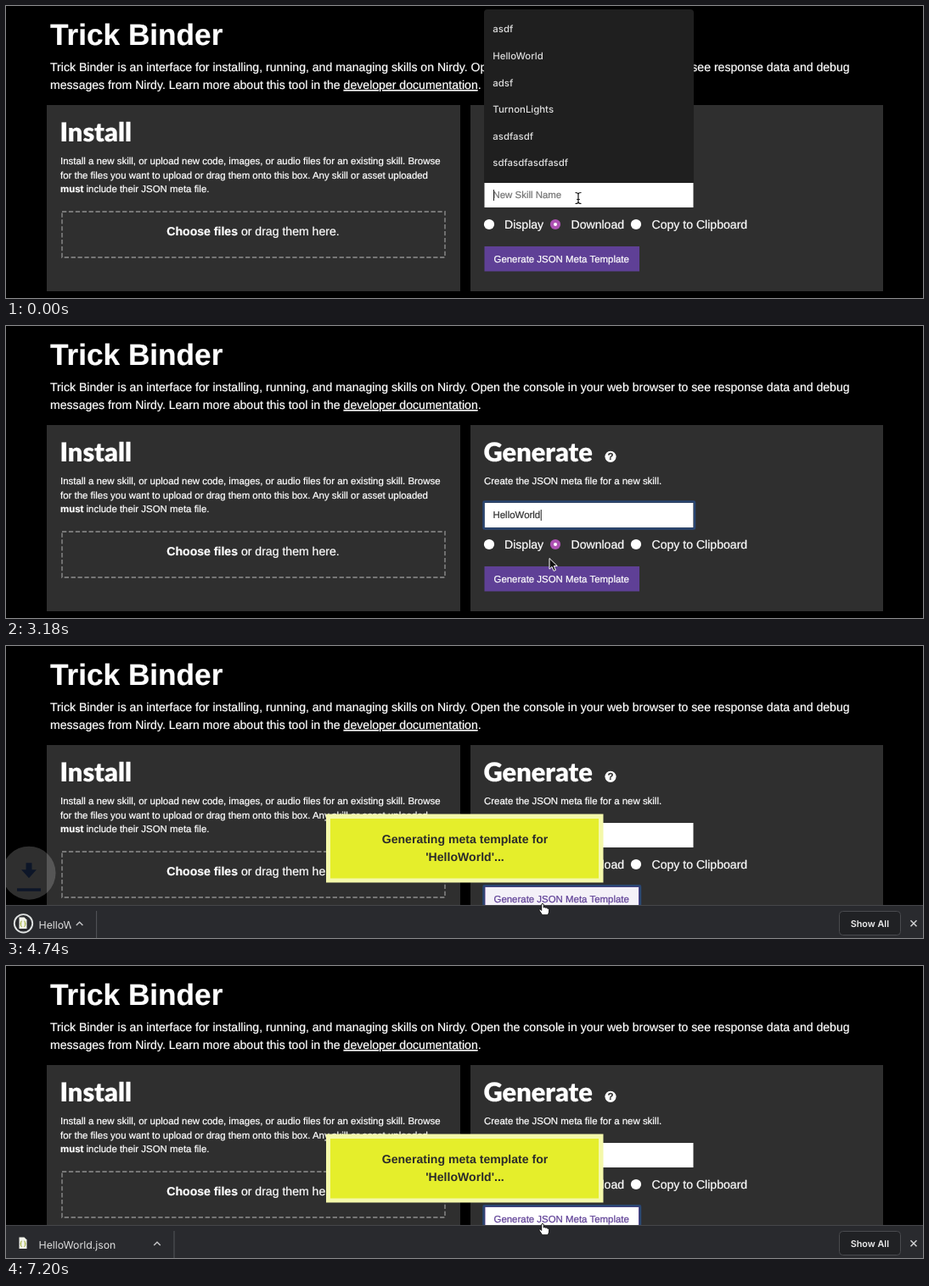
Animation, 1080 px wide and 345 px high, one loop 7.44 s. Source, as an HTML page:

```html
<!DOCTYPE html>
<html lang="en">
<head>
<meta charset="utf-8">
<title>Trick Binder</title>
<style>
  html, body { margin: 0; width: 100%; height: 100%; overflow: hidden; background: #000; }
  svg { display: block; width: 100%; height: 100%; }
  text {
    font: 14.08px "Liberation Sans", Arial, sans-serif; white-space: pre;
    text-rendering: geometricPrecision;
    color: #fff; fill: currentColor; stroke: currentColor; stroke-width: .22px;
  }
  .title { font-size: 35.2px; font-weight: bold; }
  .heading { font: 900 30.8px Lato, sans-serif; }
  .small { font-size: 11.44px; }
  .bold { font-weight: bold; }
  .ui { font: 500 11.4px Inter, sans-serif; color: #dedede; stroke: none; }
  .notice { font-weight: bold; color: #2b2b2b; stroke: none; }
  .link { text-decoration: underline; }
  .ring { fill: none; stroke: #2a4672; stroke-width: 2.5; }
</style>
</head>
<body>
<svg viewBox="0 0 1080 345">
  <defs>
    <filter id="shadow" x="-10%" y="-20%" width="120%" height="160%">
      <feDropShadow dx="0" dy="3" stdDeviation="3" flood-opacity=".35"/>
    </filter>
    <clipPath id="itemClip"><rect id="itemClipRect" y="-5" height="60"/></clipPath>
    <clipPath id="nameClip"><rect id="nameClipRect" y="-5" height="60"/></clipPath>
  </defs>

  <rect width="1080" height="345"/>
  <text class="title" x="52" y="46">Trick Binder</text>
  <text x="52" y="77">Trick Binder</text>
  <text x="131.5" y="77">is an interface for installing, running, and managing skills on Nirdy.</text>
  <text x="547.5" y="77">Open the console in your web browser to see response data and debug</text>
  <text x="52" y="98">messages from Nirdy. Learn more about this tool in the <tspan class="link">developer documentation</tspan>.</text>

  <g fill="#2f2f2f">
    <rect x="48" y="117" width="487" height="220"/>
    <rect x="547" y="117" width="486" height="220"/>
  </g>

  <text class="heading" x="63.5" y="159.5">Install</text>
  <text class="small" x="64" y="187">Install a new skill, or upload new code, images, or audio files for an existing skill. Browse</text>
  <text class="small" x="64" y="203.5">for the files you want to upload or drag them onto this box. Any skill or asset uploaded</text>
  <text class="small" x="64" y="220"><tspan class="bold">must</tspan> include their JSON meta file.</text>
  <rect x="66" y="243" width="451" height="54" fill="none" stroke="#777" stroke-width="1.8" stroke-dasharray="5.3 2.6"/>
  <text x="291" y="271" text-anchor="middle"><tspan class="bold">Choose files</tspan> or drag them here.</text>

  <text class="heading" x="562.5" y="159.5">Generate</text>
  <circle cx="712" cy="154.3" r="6.6" fill="#fff"/>
  <text class="bold" x="712" y="158.4" text-anchor="middle" style="font-size:11.5px;color:#2f2f2f">?</text>
  <text class="small" x="563" y="187">Create the JSON meta file for a new skill.</text>

  <rect x="563.5" y="209" width="246" height="29" fill="#fff"/>
  <rect id="inputRing" class="ring" x="562.5" y="207.5" width="248.5" height="32" rx="1"/>
  <text id="field" class="small" x="573.5" y="227"></text>
  <rect id="caret" y="217" width="1" height="13" fill="#222"/>

  <g fill="#fff">
    <circle cx="569" cy="258" r="6.1"/>
    <circle cx="647" cy="258" r="6.1" fill="#ad52b3"/>
    <circle cx="647" cy="258" r="2"/>
    <circle cx="742" cy="258" r="6.1"/>
  </g>
  <text x="587" y="262.6">Display</text>
  <text x="665.5" y="262.6">Download</text>
  <text x="760.5" y="262.6">Copy to Clipboard</text>

  <rect id="button" x="564" y="284.5" width="181.5" height="28.5" stroke="#5f4096"/>
  <rect id="buttonRing" class="ring" x="562.5" y="283.2" width="184.5" height="31" rx="1"/>
  <text id="buttonText" class="small" x="574.5" y="303">Generate JSON Meta Template</text>

  <g id="history">
    <path d="M563 209V8q0-4 4-4h239q4 0 4 4V209z" fill="#1f1f1f"/>
  </g>
  <g id="match">
    <path d="M563 241h247v41q0 4-4 4h-239q-4 0-4-4z" fill="#1f1f1f" filter="url(#shadow)"/>
    <text class="ui" x="573.3" y="266.7">HelloWorld</text>
  </g>

  <g id="toast" text-anchor="middle">
    <rect x="377" y="-.5" width="326.5" height="81" fill="#f4f8aa"/>
    <rect x="382" y="5" width="316" height="70.5" fill="#e5ee2b"/>
    <text class="notice" x="540.5" y="34.3">Generating meta template for</text>
    <text class="notice" x="540.5" y="55.3">'HelloWorld'...</text>
  </g>

  <g id="arrival">
    <circle r="31.5" fill="#fff"/>
    <path d="M-3.5-12h7v8h5.5L0 6-9-4h5.5zM-14 18h28v3.5h-28z" fill="#4a78d8"/>
  </g>

  <g id="shelf">
    <rect width="1080" height="40" fill="#292a2e"/>
    <rect width="1080" height="1" fill="#45464a"/>
    <g clip-path="url(#itemClip)">
      <path d="M15.5 14.5h6l3 3v10.5h-9z" fill="#f2f3ea"/>
      <path d="M18.8 19q-1.5 0-1.2 2t-.9 1.3q1.2 0 .9 1.5t1.2 2M21.2 19q1.5 0 1.2 2t.9 1.3q-1.2 0-.9 1.5t-1.2 2" fill="none" stroke="#9bab2c" stroke-width=".9"/>
      <circle id="pulse" cx="20.5" cy="21.8" r="10.7" fill="none" stroke="#dfe2e2" stroke-width="1.9"/>
    </g>
    <g clip-path="url(#nameClip)">
      <text class="ui" x="38.5" y="28.4" style="font-size:12.3px;font-weight:400">HelloWorld.json</text>
    </g>
    <path id="chevron" d="M-3.8 2L0-1.8 3.8 2" fill="none" stroke="#c6c7c9" stroke-width="1.4"/>
    <rect id="divider" y="7" width="1" height="32" fill="#55565a"/>
  </g>
  <g id="shelfButtons">
    <rect x="981.5" y="-13.5" width="72" height="28" rx="4" fill="#202124" stroke="#494a4e"/>
    <text class="ui" x="1017.3" y="4.5" text-anchor="middle" style="font-size:10.8px;font-weight:600;color:#eee">Show All</text>
    <path d="M1065.5-2.8l7 7m0-7l-7 7" stroke="#d0d1d3" stroke-width="1.5"/>
  </g>

  <g id="cursor">
    <path id="beam" d="M-3.5-6.5Q0-6.5 0-4.5Q0-6.5 3.5-6.5M0-4.5V4.5M-3.5 6.5Q0 6.5 0 4.5Q0 6.5 3.5 6.5M-1.8 1.5H1.8" fill="none" stroke="#111" stroke-width="1.2"/>
    <path id="arrow" d="M0 .5V13.2L3 10.4 5 15.4 7.4 14.4 5.3 9.6H9.3Z" fill="#111" stroke="#fff"/>
    <path id="hand" d="M-1.3 1.2Q0-.6 1.2 1.2V5Q2.5 4 3.5 5.3 4.8 4.5 5.7 6 7.4 5.5 7.6 7.5V10Q7.3 12 6 13.8H-.5Q-1.5 11.5-3.7 9-4.8 7-3.2 6.9-2.2 7-1.3 8.5Z" fill="#fff" stroke="#111"/>
  </g>
</svg>

<script>
const LOOP = 7440, STEP = 60;
const el = Object.fromEntries([...document.querySelectorAll("[id]")].map(e => [e.id, e]));
const set = (node, attrs) => { for (const k in attrs) node.setAttribute(k, attrs[k]); };
const show = (node, on) => set(node, { opacity: +on });
const move = (node, x, y) => set(node, { transform: `translate(${x} ${y})` });
const ramp = (t, from, to) => Math.min(1, Math.max(0, (t - from) / (to - from)));
const smooth = p => p * p * (3 - 2 * p);
const mix = (a, b, p) => a + (b - a) * p;
const mixColor = (a, b, p) => `rgb(${a.map((v, i) => Math.round(mix(v, b[i], p)))})`;

const WHITE = [255, 255, 255], PURPLE = [95, 64, 150];
const WORD = "HelloWorld";
const KEY_TIMES = [420, 720, 1020, 1200, 1380, 1620, 1740, 1860, 1980, 2100];
const CLICK = 4140;

["asdf", "HelloWorld", "adsf", "TurnonLights", "asdfasdf", "sdfasdfasdfasdf"].forEach((name, i) => {
  const item = document.createElementNS("http://www.w3.org/2000/svg", "text");
  set(item, { class: "ui", x: 573.3, y: 31.2 + i * 31.65 });
  item.textContent = name;
  el.history.append(item);
});

function drawForm(t) {
  const typed = t < CLICK ? WORD.slice(0, KEY_TIMES.filter(k => k <= t).length) : "";
  el.field.textContent = typed || (t < CLICK ? "New Skill Name" : "");
  el.field.style.color = typed ? "#333" : "#757575";
  set(el.caret, { x: 574 + (typed ? el.field.getComputedTextLength() : 0) });
  show(el.caret, t < CLICK);
  set(el.inputRing, { opacity: t < CLICK ? ramp(t, 0, 180) : 0 });
  show(el.history, t < KEY_TIMES[0]);
  set(el.match, { opacity: t < KEY_TIMES[0] ? 0 : 1 - ramp(t, 2160, 2340) });

  const hover = t < CLICK ? 0.86 * ramp(t, 3900, 4080)
    : t < 4480 ? 0.86 * (1 - ramp(t, CLICK, 4320))
    : ramp(t, 4480, 4760);
  set(el.button, { fill: mixColor(PURPLE, WHITE, hover) });
  el.buttonText.style.color = mixColor(WHITE, PURPLE, ramp(hover, 0.3, 0.8));
  show(el.buttonRing, t >= CLICK);
}

function drawDownload(t) {
  const top = mix(345, 306, ramp(t, 4428, 4620));
  move(el.toast, 0, top - 107);
  set(el.toast, { opacity: ramp(t, CLICK, 4320) });

  const p = ramp(t, 4230, 4830);
  move(el.arrival, 27, top - 28.5 - 62 * (1 - p));
  set(el.arrival, { opacity: 0.36 * (1 - 4 * (p - 0.5) ** 2) });

  move(el.shelf, 0, top);
  move(el.shelfButtons, 0, (top + 345) / 2 + 1.5);
  show(el.shelfButtons, top < 345);
  const width = mix(22, 198, 1 - (1 - ramp(t, 4550, 5230)) ** 2);
  set(el.itemClipRect, { width });
  set(el.nameClipRect, { width: Math.max(0, width - 30) });
  move(el.chevron, width - 20, 22);
  set(el.divider, { x: width - 0.5 });
  set(el.pulse, { opacity: Math.cos(ramp(t, 4860, 7200) * 5 * Math.PI) / 2 + 0.5 });
}

function drawCursor(t) {
  const p = smooth(ramp(t, 2400, 3180)), q = smooth(ramp(t, 3840, 3960));
  const x = mix(mix(674, 640, p), 632, q), y = mix(mix(227, 274, p), 304, q);
  move(el.cursor, x, y);
  show(el.cursor, t < KEY_TIMES[0] || t >= 2400);
  show(el.beam, y < 240);
  show(el.arrow, y >= 240 && y < 284);
  show(el.hand, y >= 284);
}

function frame(now) {
  const t = Math.floor(now % LOOP / STEP) * STEP;
  drawForm(t);
  drawDownload(t);
  drawCursor(t);
  requestAnimationFrame(frame);
}
requestAnimationFrame(frame);
</script>
</body>
</html>
```
